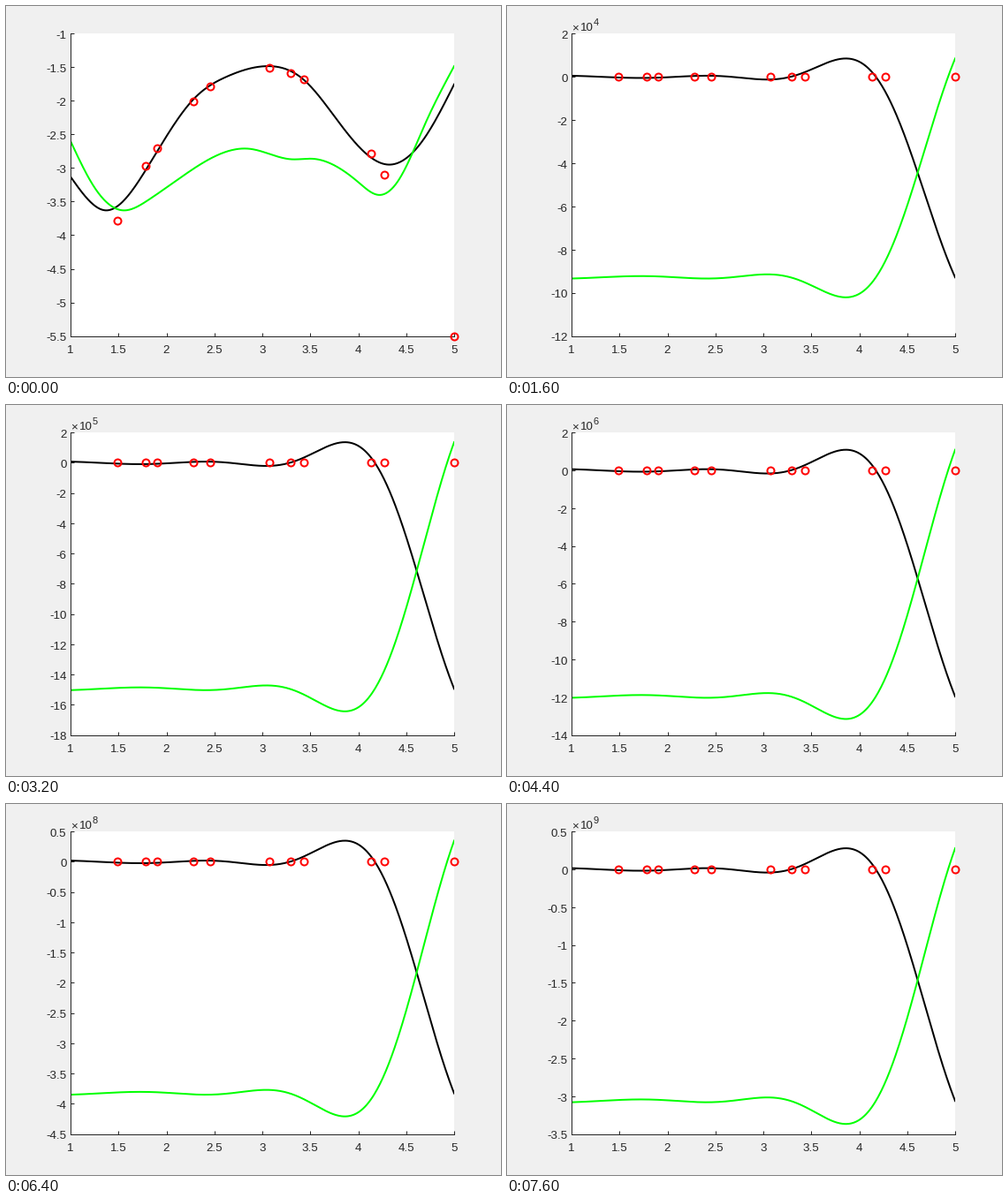
Animation of 560x420 px, one loop 8 s. Source, as a matplotlib script:

```python
import math

import matplotlib.pyplot as plt
import numpy as np
from matplotlib.animation import FuncAnimation

W, H, DPI = 560, 420, 100
LEFT, RIGHT, TOP, BOTTOM = 73, 507, 31.2, 373.6
FRAMES, INTERVAL = 20, 400
MAX_STEPS = 10
PT = 72 / DPI  # points per pixel
INK = "#262626"

plt.rcParams["font.family"] = "Liberation Sans"

# Key points (x, y) of the first pair of curves, and the sampled points.
MEAN = [(1, -3.13), (1.36, -3.63), (1.78, -3.04), (2.28, -1.98),
        (2.63, -1.64), (3.04, -1.485), (3.43, -1.685), (3.78, -2.286),
        (4.32, -2.95), (4.7, -2.535), (5, -1.755)]
SCORE = [(1, -2.6), (1.23, -3.245), (1.55, -3.63), (1.8, -3.486),
         (2.17, -3.12), (2.87, -2.715), (3.3, -2.87), (3.53, -2.863),
         (4, -3.21), (4.21, -3.4), (4.43, -3.16), (4.7, -2.335), (5, -1.485)]
SAMPLES = [(1.487, -3.78), (1.787, -2.97), (1.905, -2.7), (2.281, -2.01),
           (2.457, -1.79), (3.071, -1.505), (3.292, -1.585), (3.43, -1.685),
           (4.134, -2.79), (4.27, -3.105), (5, -5.5)]


def spline(nodes, x):
    """Natural cubic spline through (x, y) nodes."""
    nx, ny = np.array(nodes, float).T
    n = len(nx)
    system = np.zeros((n + 2, n + 2))
    system[:n, :n] = abs(nx[:, None] - nx) ** 3
    system[:n, n] = system[n, :n] = 1
    system[:n, n + 1] = system[n + 1, :n] = nx
    c = np.linalg.solve(system, np.append(ny, [0, 0]))
    return abs(x[:, None] - nx) ** 3 @ c[:n] + c[n] + c[n + 1] * x


def drift_shape(x):
    """Oscillation that swells to the right: a quintic under a bell curve."""
    wave = np.prod([x - root for root in (1.3, 2.1, 2.66, 3.285, 4.173)],
                   axis=0)
    return -wave * np.exp(-0.637 * (x - 3.6) ** 2)


xs = np.linspace(1, 5, 400)
mean = spline(MEAN, xs)
score = spline(SCORE, xs)
score_unit = (score - score.min()) / np.ptp(score)
drift = drift_shape(xs)
drift /= -drift[-1]
sample_x, sample_y = zip(*SAMPLES)


def amplitude(i):
    """Small and unsteady at first, then doubling at every step."""
    return (0, -1.5, -4.3, 500)[i] if i < 4 else 5841 * 2**i - 600


def curves(i):
    growth = amplitude(i) * drift
    black = mean + growth
    low, high = black.min(), black.max()
    if i < 3:
        return black, low + score_unit * (high - low)
    return black, low - growth * (high - low) / -low


def nice_limits(low, high):
    """Smallest 1-2-5 step that covers the data in ten intervals."""
    for power in range(-1, 12):
        for digit in (1, 2, 5):
            step = digit * 10.0**power
            first, last = math.floor(low / step), math.ceil(high / step)
            if last - first <= MAX_STEPS:
                return first, last, step


fig = plt.figure(figsize=(W / DPI, H / DPI), dpi=DPI, facecolor="#f0f0f0")
ax = fig.add_axes([LEFT / W, 1 - BOTTOM / H,
                   (RIGHT - LEFT) / W, (BOTTOM - TOP) / H])
ax.spines[["top", "right"]].set_visible(False)
ax.spines[["left", "bottom"]].set(color=INK, linewidth=PT)
ax.tick_params(direction="in", length=4.3 * PT, width=PT, color=INK,
               labelleft=False, labelbottom=False)
ax.set_xlim(1, 5)
x_ticks = np.arange(1, 5.1, 0.5)
ax.set_xticks(x_ticks)

black_line, = ax.plot([], [], color="black", lw=2 * PT)
green_line, = ax.plot([], [], color="#00ff00", lw=2 * PT)
ax.plot(sample_x, sample_y, "o", mfc="none", mec="red", ms=8 * PT,
        mew=2 * PT, clip_on=False, zorder=5)


def stage_text(x, y, text="", size=13.33, ha="left"):
    """Text with its baseline at y, in pixels from the top left."""
    return fig.text(x / W, 1 - y / H, text, fontsize=size * PT, color=INK,
                    ha=ha, va="baseline")


for tick, x in zip(x_ticks, np.linspace(LEFT, RIGHT, len(x_ticks))):
    stage_text(x, 393, f"{tick:g}", ha="center")
y_labels = [stage_text(68.5, 0, ha="right") for _ in range(MAX_STEPS + 1)]
times_sign = stage_text(73.5, 28.5, "×")
ten = stage_text(83, 28.5, "10")
exponent = stage_text(98, 22.5, size=11)


def update(i):
    black, green = curves(i)
    black_line.set_data(xs, black)
    green_line.set_data(xs, green)

    low = min(black.min(), green.min(), min(sample_y))
    high = max(black.max(), green.max(), max(sample_y))
    first, last, step = nice_limits(low, high)
    ticks = np.arange(first, last + 1) * step
    scientific = max(-ticks[0], ticks[-1]) >= 1e4
    power = math.ceil(math.log10(step / 2) - 1e-9) if scientific else 0

    ax.set_ylim(ticks[0], ticks[-1])
    ax.set_yticks(ticks)
    heights = np.linspace(BOTTOM, TOP, len(ticks)) + 5.8
    for label in y_labels:
        label.set_text("")
    for label, tick, y in zip(y_labels, ticks, heights):
        label.set_text(f"{tick / 10**power:g}")
        label.set_y(1 - y / H)
    for part in (times_sign, ten, exponent):
        part.set_visible(scientific)
    exponent.set_text(str(power))
    return black_line, green_line


animation = FuncAnimation(fig, update, frames=FRAMES, interval=INTERVAL,
                          repeat=True, repeat_delay=0, blit=False)
plt.show()
```
